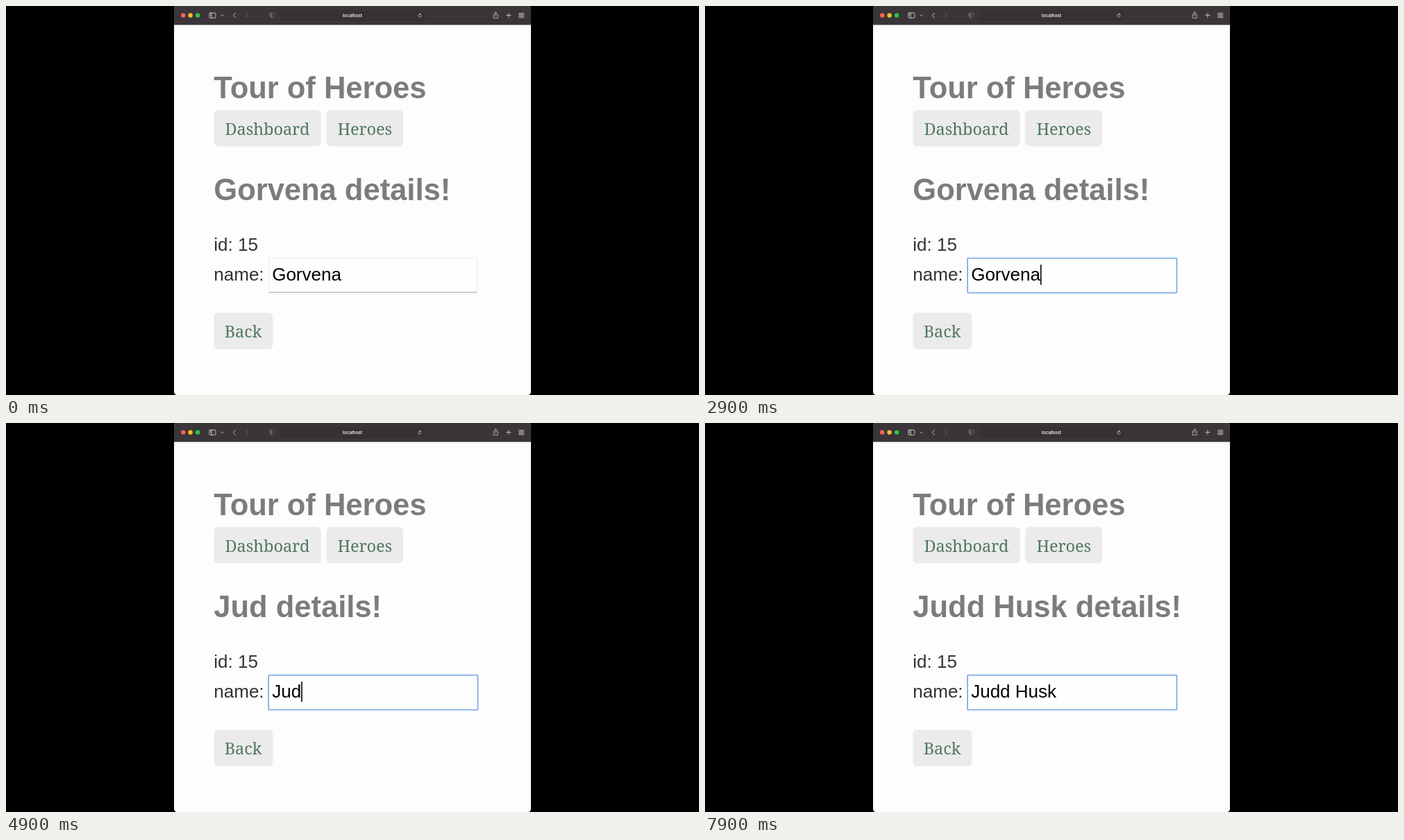
Recreate the animation shown at these times as an HTML page. Size 998 by 561 pixels, loop 8000 ms.

```html
<!DOCTYPE html>
<html lang="en">
<head>
<meta charset="utf-8">
<title>Tour of Heroes</title>
<style>
  html, body { margin: 0; width: 100%; height: 100%; overflow: hidden; background: #000; }
  svg { display: block; width: 100vw; height: 100vh; }
  text { font-family: "Liberation Sans", Arial, sans-serif; font-size: 26px; fill: #333; white-space: pre; }
  .h { font-size: 43.5px; font-weight: 700; fill: #7c7c7c; }
  .btn rect { fill: #ebebeb; }
  .btn text { font-family: "Noto Serif", Georgia, serif; font-size: 23.4px; fill: #50775f; text-anchor: middle; }
  #value { fill: #000; }
  .url { font-family: Inter, "Liberation Sans", sans-serif; font-size: 6.4px; font-weight: 600; fill: #f4f2f3; text-anchor: middle; }
  .icons { fill: none; stroke: #c5c1c3; stroke-width: 1; stroke-linecap: round; stroke-linejoin: round; }
  #bar { fill: #3a3538; }
  #field { fill: #363135; }
  #shield { opacity: .38; }
  .idle #bar { fill: #302b2e; }
  .idle #field { fill: #2c272a; }
  .idle .icons { stroke: #938e91; }
  .idle #shield { opacity: .8; }
  .idle #lights circle { fill: #5d585b; }
</style>
</head>
<body>
<svg id="win" viewBox="0 0 998 561">
  <defs>
    <clipPath id="frame"><rect x="242" y="0" width="514" height="561" rx="4.5"/></clipPath>
  </defs>
  <rect width="998" height="561" fill="#000"/>
  <g clip-path="url(#frame)">
    <rect x="242" width="514" height="561" fill="#fdfdfd"/>
    <rect id="bar" x="242" width="514" height="27.3"/>
    <rect id="field" x="396" y="6" width="207" height="15.5" rx="3"/>
  </g>

  <g id="lights">
    <circle cx="255.2" cy="13.5" r="3.2" fill="#f9605a"/>
    <circle cx="265.6" cy="13.5" r="3.2" fill="#f9bd2f"/>
    <circle cx="276.1" cy="13.5" r="3.2" fill="#2bc740"/>
  </g>
  <g class="icons">
    <path d="M293.9 10h7q1 0 1 1v5.2q0 1-1 1h-7q-1 0-1-1v-5.2q0-1 1-1zM296.2 10v7.2M294.1 12h.8M294.1 13.8h.8"/>
    <path d="M309.9 13l1.6 1.5 1.6-1.5M330.6 10.2l-3.5 3.4 3.5 3.4"/>
    <path d="M345.6 10.2l3.5 3.4-3.5 3.4" opacity=".32"/>
    <g id="shield">
      <path d="M383.3 9.7l3.4 1v3.1q0 2.4-3.4 3.8-3.4-1.4-3.4-3.8v-3.1z" stroke-width=".8"/>
      <path d="M383.3 9.7v7.9q-3.4-1.4-3.4-3.8v-3.1z" fill="#aaa5a8" stroke="none"/>
    </g>
    <path d="M597.6 12.1a2.3 2.3 0 1 0 .7 2M596 10.6l1.7 1.5-1.8 1" stroke-width=".8"/>
    <path d="M703.6 12.1h-1.5v5.3h6.2v-5.3h-1.5M705.2 14.6v-5.9M703.4 10.4l1.8-1.8 1.8 1.8" stroke-width=".85"/>
    <path d="M720.8 13.4h6.2M723.9 10.3v6.2"/>
    <path d="M739.2 10.3h2.5v2.5h-2.5zM743.2 10.3h2.5v2.5h-2.5zM739.2 14.3h2.5v2.5h-2.5zM743.2 14.3h2.5v2.5h-2.5z" stroke-width=".85"/>
  </g>
  <text class="url" x="499" y="15.9">localhost</text>

  <text class="h" x="299.3" y="132.5">Tour of Heroes</text>
  <g class="btn">
    <rect x="299.3" y="149.8" width="154.3" height="52.6" rx="6.5"/>
    <text x="376.5" y="185.7">Dashboard</text>
    <rect x="461.2" y="149.8" width="110.8" height="52.6" rx="6.5"/>
    <text x="516.8" y="185.7">Heroes</text>
    <rect x="299.3" y="442.3" width="85" height="52.8" rx="6.5"/>
    <text x="341.6" y="478.4">Back</text>
  </g>
  <text class="h" id="heading" x="299.3" y="280"></text>
  <text x="299.3" y="353.2">id: 15</text>
  <text x="299.3" y="396.4">name:</text>

  <g id="plain" fill="none">
    <rect x="379" y="363.5" width="299" height="49.5" fill="#fefefe" stroke="#ececec"/>
    <path d="M378.5 412.9h300" stroke="#b4b4b4" stroke-width="1.2"/>
  </g>
  <rect id="ring" x="378.1" y="363.6" width="301.4" height="50" rx="1" fill="#fefefe" stroke="#80abe3" stroke-width="1.8"/>
  <text id="value" x="383.2" y="396.4"></text>
  <rect id="caret" y="373" width="1.6" height="29" fill="#000"/>
</svg>
<script>
  const LOOP = 8000, LEFT = 383.2;
  const FIRST = "Gorvena", LAST = "Judd Husk";
  const BLUR = 200, ACTIVE = 2700, FOCUS = 2800, ERASE = 3400, ERASE_STEP = 100;
  const keys = [4300, 4700, 4900, 5100, 5300, 5600, 5800, 6000, 6200];
  const caretOff = [[6900, 7400], [7900, 8000]];

  const el = id => document.getElementById(id);
  const [win, heading, value, plain, ring, caret] =
    ["win", "heading", "value", "plain", "ring", "caret"].map(el);
  const show = (node, on) => node.setAttribute("visibility", on ? "visible" : "hidden");
  const within = (t, [from, to]) => t >= from && t < to;

  function nameAt(t) {
    if (t >= keys[0]) return LAST.slice(0, keys.filter(k => k <= t).length);
    const erased = t < ERASE ? 0 : Math.floor((t - ERASE) / ERASE_STEP) + 1;
    return FIRST.slice(0, Math.max(0, FIRST.length - erased));
  }

  function draw(t) {
    const name = nameAt(t), focused = t >= FOCUS;
    win.classList.toggle("idle", within(t, [BLUR, ACTIVE]));
    heading.textContent = (name.trim() + " details!").trim();
    value.textContent = name;
    show(plain, !focused);
    show(ring, focused);
    show(caret, focused && !caretOff.some(span => within(t, span)));
    caret.setAttribute("x", LEFT + (name ? value.getComputedTextLength() : 0));
  }

  const start = performance.now();
  function tick(now) {
    draw(Math.max(0, now - start) % LOOP);
    requestAnimationFrame(tick);
  }
  draw(0);
  requestAnimationFrame(tick);
</script>
</body>
</html>
```
